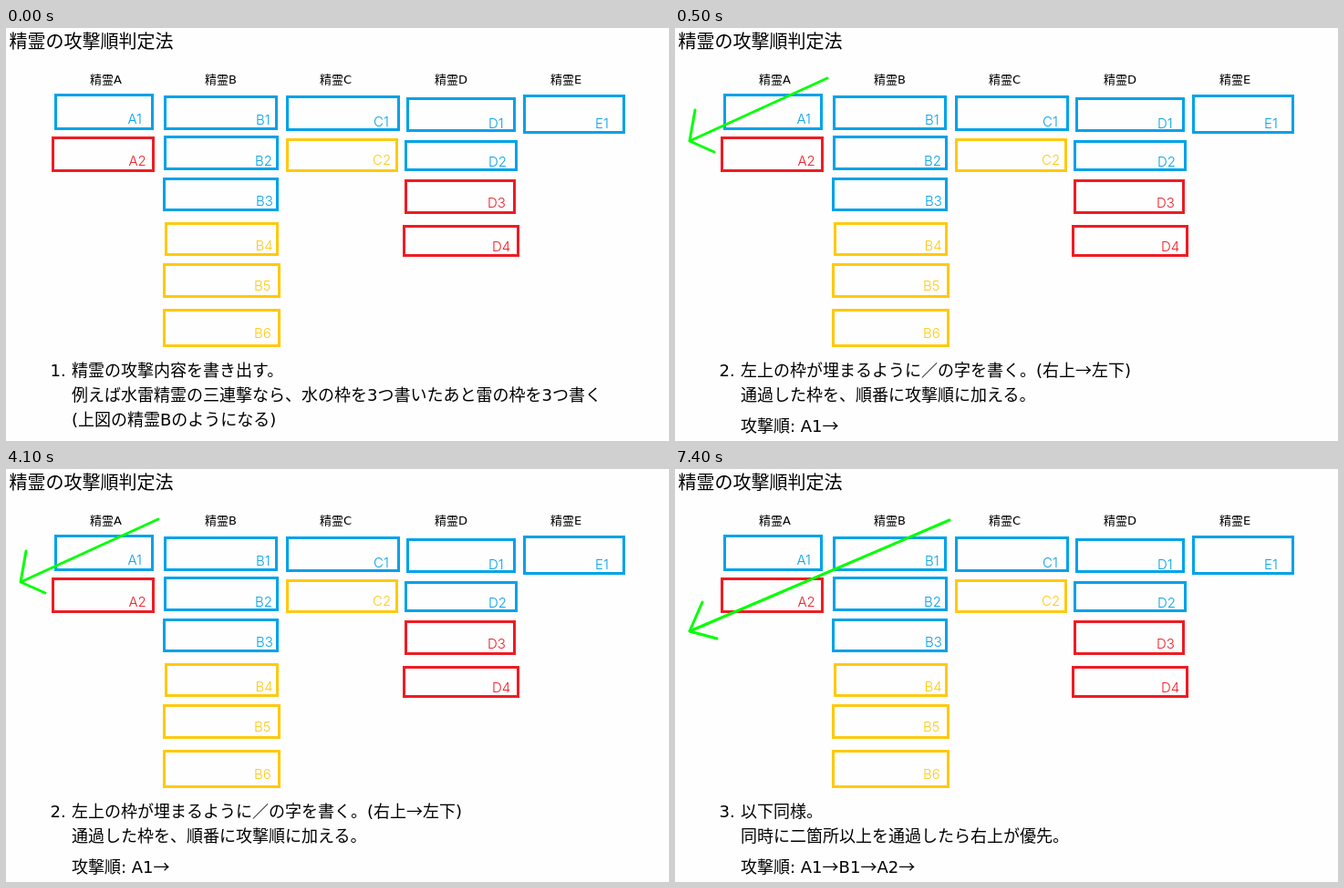
Animation of 727x453 px, one loop 8000 ms. Source, as an HTML page:

```html
<!DOCTYPE html>
<html lang="ja">
<head>
<meta charset="utf-8">
<title>精霊の攻撃順判定法</title>
<style>
  html, body { margin: 0; width: 100%; height: 100%; overflow: hidden; background: #fefefe; }
  svg { display: block; width: 727px; height: 453px; }
  text { font: 18px "DejaVu Sans", "Noto Sans CJK JP", "Noto Sans CJK", sans-serif; white-space: pre; }
  .title { font-size: 20px; font-weight: 500; font-family: "Noto Sans CJK JP", "Noto Sans CJK", sans-serif; }
  .head { font-size: 13px; }
  .label { font: 300 15px Inter, "Liberation Sans", sans-serif; }
  .to { font-family: "Noto Sans CJK JP", "Noto Sans CJK", sans-serif; }
  .box { fill: none; stroke-width: 3; }
  .arrow { fill: none; stroke: #0f0; stroke-width: 3; stroke-linecap: round; stroke-linejoin: round; }
</style>
</head>
<body>
<svg id="stage" viewBox="0 0 727 453"></svg>
<script>
const LOOP = 8000;
const BLUE = '#00a2e8', RED = '#ed1c24', YELLOW = '#ffc90e';
const stage = document.getElementById('stage');

function add(parent, tag, attrs) {
  const node = document.createElementNS('http://www.w3.org/2000/svg', tag);
  for (const key in attrs) node.setAttribute(key, attrs[key]);
  return parent.appendChild(node);
}

// The arrow sign takes a full-width glyph, so it gets its own font.
function write(parent, x, y, string, attrs) {
  const text = add(parent, 'text', { x, y, ...attrs });
  for (const part of string.split(/(→)/)) {
    add(text, 'tspan', part === '→' ? { class: 'to' } : {}).textContent = part;
  }
}

write(stage, 3.5, 22, '精霊の攻撃順判定法', { class: 'title' });
[92, 218, 344, 470, 597].forEach((x, i) =>
  write(stage, x, 61, '精霊' + 'ABCDE'[i], { class: 'head' }));

// name, colour, outer left, top, right, bottom, label x, label baseline
const boxes = [
  ['A1', BLUE, 53, 72, 162, 112, 133.5, 105],
  ['A2', RED, 50, 119, 163, 158, 134.5, 151],
  ['B1', BLUE, 173, 74, 298, 112, 274, 106],
  ['B2', BLUE, 173, 118, 299, 156, 273, 151],
  ['B3', BLUE, 172, 164, 299, 201, 274, 195],
  ['B4', YELLOW, 174, 213, 299, 250, 273.5, 244],
  ['B5', YELLOW, 172, 258, 301, 296, 272, 288],
  ['B6', YELLOW, 172, 308, 301, 350, 272, 340],
  ['C1', BLUE, 307, 74, 432, 113, 403, 108],
  ['C2', YELLOW, 307, 121, 430, 158, 402, 150],
  ['D1', BLUE, 439, 76, 559, 114, 529, 110],
  ['D2', BLUE, 437, 123, 561, 157, 529, 152],
  ['D3', RED, 437, 166, 559, 204, 528, 197],
  ['D4', RED, 435, 216, 563, 251, 533, 245],
  ['E1', BLUE, 567, 73, 679, 116, 646, 110],
];
for (const [name, color, left, top, right, bottom, x, y] of boxes) {
  add(stage, 'rect', {
    class: 'box', stroke: color, x: left + 1.5, y: top + 1.5,
    width: right - left - 3, height: bottom - top - 3,
  });
  write(stage, x, y, name, { class: 'label', fill: color });
}

const steps = [
  {
    start: 0, end: 500,
    lines: [
      [382, '精霊の攻撃内容を書き出す。'],
      [409, '例えば水雷精霊の三連撃なら、水の枠を3つ書いたあと雷の枠を3つ書く'],
      [436, '(上図の精霊Bのようになる)'],
    ],
  },
  {
    start: 500, end: 6500,
    arrow: 'M167 55L16 124M22 90L16 124L43 136',
    lines: [
      [382, '左上の枠が埋まるように／の字を書く。(右上→左下)'],
      [409, '通過した枠を、順番に攻撃順に加える。'],
      [443, '攻撃順: A1→'],
    ],
  },
  {
    start: 6500, end: LOOP,
    arrow: 'M301 56L16 178M30 146L16 178L46 186',
    lines: [
      [382, '以下同様。'],
      [409, '同時に二箇所以上を通過したら右上が優先。'],
      [443, '攻撃順: A1→B1→A2→'],
    ],
  },
];

const groups = steps.map(({ arrow, lines }, i) => {
  const group = add(stage, 'g', {});
  if (arrow) add(group, 'path', { class: 'arrow', d: arrow });
  write(group, 48.5, 382, `${i + 1}.`);
  for (const [y, string] of lines) write(group, 72, y, string);
  return group;
});

function draw() {
  const time = performance.now() % LOOP;
  steps.forEach(({ start, end }, i) => {
    groups[i].style.display = time >= start && time < end ? '' : 'none';
  });
  requestAnimationFrame(draw);
}
draw();
</script>
</body>
</html>
```
